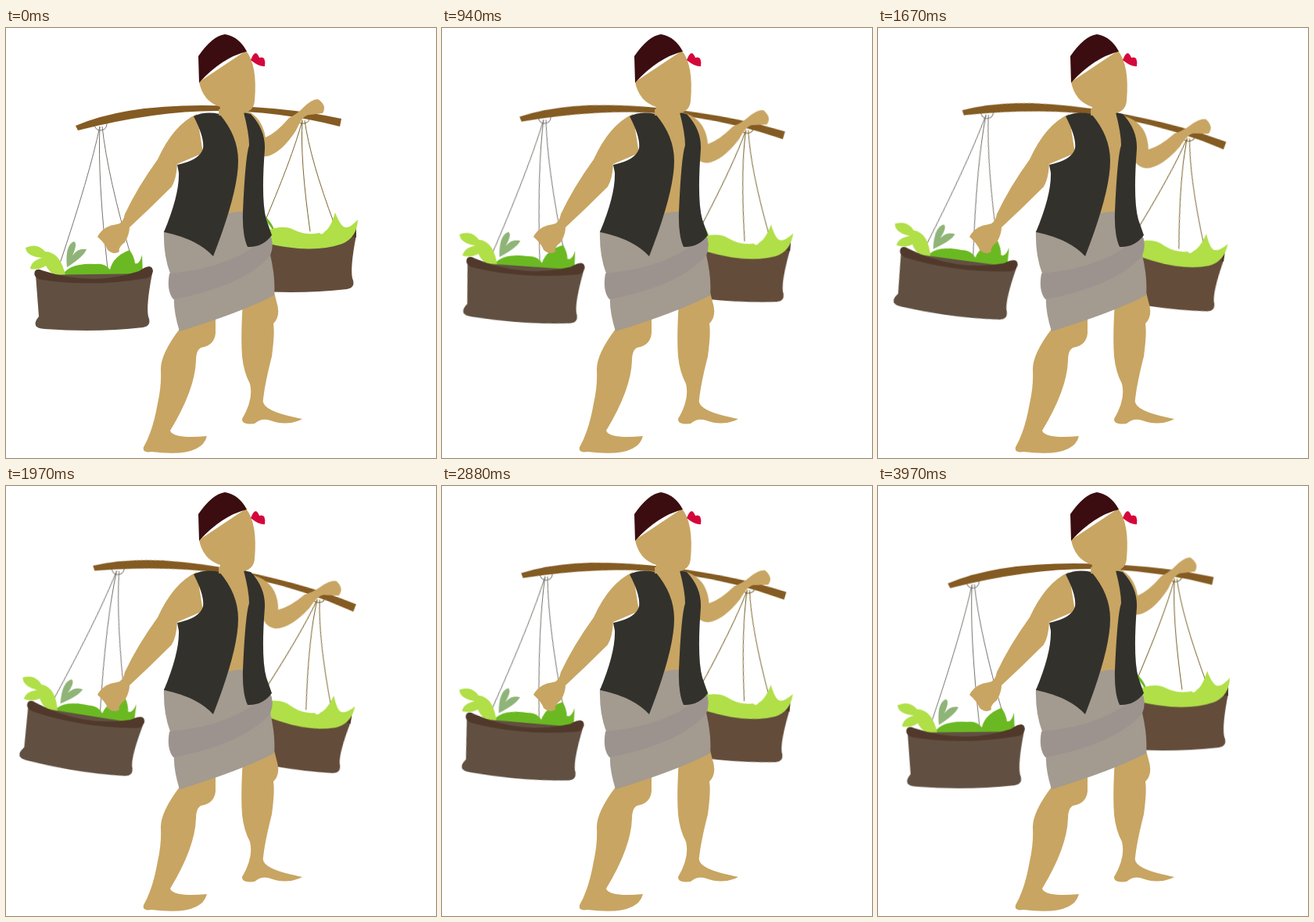
An HTML page without scripts for the animation above (4000 ms loop, 550x550 px).

```html
<!DOCTYPE html>
<html lang="en">
<head>
<meta charset="utf-8">
<title>Carrier with two baskets</title>
<style>
  html, body { margin: 0; width: 100%; height: 100%; overflow: hidden; background: #fff; }
  svg { display: block; width: 100%; height: 100%; }
  .load {
    transform-origin: 234px 243px;
    animation: sway 2s linear infinite alternate;
  }
  @keyframes sway {
    to { transform: rotate(10deg); }
  }
  .skin { fill: #c8a562; }
  .vest { fill: #33312c; }
  .pole { fill: #845b22; }
  .ropes { fill: none; stroke: #77736e; }
  .ropes.right { stroke: #7b642f; }
  #ropes * { vector-effect: non-scaling-stroke; }
  .basket { fill: #615041; }
  .basket.right { fill: #634c3a; }
  .rim { fill: #50392b; }
  .lime { fill: #b0df48; }
  .green { fill: #6bb922; }
  .sage { fill: #8fb478; }
  .cloth { fill: #a39a90; }
  .fold { fill: #9d938e; }
  .hat { fill: #3b0d10; }
  .flower { fill: #d4073b; }
</style>
</head>
<body>
<svg viewBox="0 0 550 550">
  <defs>
    <g id="ropes">
      <path d="M120 126Q107 188 68 304M120 126Q117 190 130 308M123 126Q130 190 161 296"/>
      <circle cx="121" cy="123" r="8"/>
    </g>
    <path id="basket" d="M38 316L42 369Q30 384 50 385Q115 390 175 383Q187 381 182 369Q179 355 187 314Z"/>
  </defs>

  <g class="load">
    <use href="#ropes" class="ropes"/>
    <use href="#ropes" class="ropes right" transform="translate(259 20) scale(1 .78)"/>

    <!-- right basket -->
    <use href="#basket" class="basket right" transform="translate(261 -49)"/>
    <path class="rim" d="M436 266Q439 254 448 253V268Z"/>
    <path class="green" d="M322 232Q342 248 344 262Z"/>
    <path class="lime" d="M328 262Q352 250 368 258T401 262Q404 266 408 260Q415 256 421 236Q428 254 434 255T450 245Q449 268 430 276Q390 290 328 274Z"/>

    <!-- left basket -->
    <path class="green" d="M70 320Q78 300 114 302Q126 300 133 309Q137 292 158 284Q164 292 165 301Q171 303 174 290L175 314L150 325Z"/>
    <path class="sage" d="M78 306Q75 278 87 273Q92 276 85 291Q92 281 103 283Q100 292 78 306Z"/>
    <path class="lime" d="M77 320Q70 286 50 286Q40 274 25 281Q26 292 46 294Q32 298 31 308Q42 310 51 304Q58 318 77 320Z"/>
    <use href="#basket" class="basket"/>
    <path class="rim" d="M46 310Q110 331 170 311Q187 299 188 311Q187 318 180 320Q110 332 45 322Q34 319 37 311Q40 307 46 310Z"/>

    <path class="pole" d="M89 125Q150 99 250 99T429 116L427 126Q350 106 270 106T92 131Z"/>
    <path class="skin" d="M294 102Q326 106 332 140Q346 134 362 115Q372 110 378 104Q390 91 399 91Q411 99 405 109L389 111Q380 110 371 131Q352 160 334 164Q320 166 312 150Z"/>
  </g>

  <!-- legs -->
  <path class="skin" d="M222 385Q197 418 198 438T194 480Q188 515 176 536Q174 544 186 542Q250 550 257 522Q214 526 210 515Q242 462 243 425Q243 413 249 409Q267 406 268 390V365Z"/>
  <path class="skin" d="M303 350Q300 395 302 420Q304 440 312 455Q317 475 302 500Q301 508 318 506Q327 498 338 502Q360 510 379 500Q325 490 329 475Q331 455 340 420Q344 390 342 378Q352 368 346 350L343 338Z"/>

  <!-- torso and sarong -->
  <path class="skin" d="M272 104H306L313 140L306 242H276Z"/>
  <path class="cloth" d="M202 259Q201 290 210 314L215 345Q214 362 222 388Q300 364 343 342Q345 320 338 290L335 262L303 235Q290 235 282 238L262 280Z"/>
  <path class="fold" d="M209 314Q296 306 337 263Q344 276 338 291Q304 330 214 347Q205 336 209 314Z"/>

  <!-- left arm and vest -->
  <path class="skin" d="M244 110Q214 124 194 168Q168 204 152 238Q150 250 142 251Q124 253 117 267Q128 277 130 284Q138 291 145 286Q143 281 152 274Q158 264 158 255Q185 230 212 203Q218 193 219 174L252 160Z"/>
  <path class="vest" d="M240 113Q254 106 273 110Q297 138 297 170Q297 210 265 292Q245 270 202 261Q222 213 221 185L219 175Q248 169 252 154Q254 140 240 113Z"/>
  <path class="vest" d="M304 108L313 110Q332 130 331 155Q326 220 333 245L340 265Q328 281 309 280Q302 265 303 235Q306 165 311 150Q311 135 304 108Z"/>

  <!-- head -->
  <path class="skin" d="M247 69Q252 94 274 101L272 112L304 109Q317 106 318 93Q322 48 307 29Z"/>
  <path class="hat" d="M247 70L246 36Q264 10 280 8Q298 11 308 30Q276 38 247 70Z"/>
  <path class="flower" d="M313 41Q319 25 324 38Q333 35 331 49Q324 50 313 41Z"/>
</svg>
</body>
</html>
```
